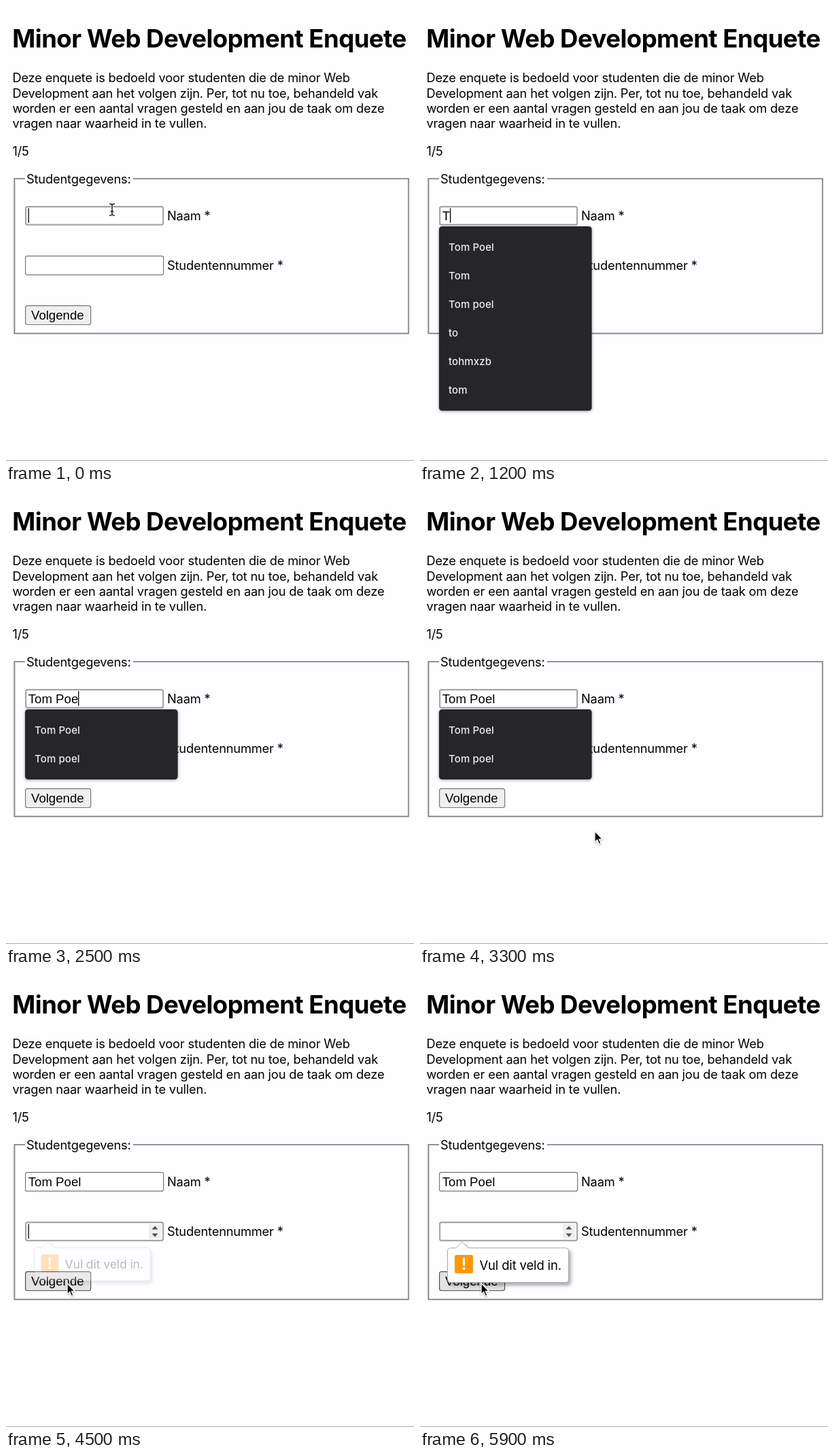
An HTML page that plays this animation: 600x669 px, repeating every 6000 ms.

```html
<!DOCTYPE html>
<html lang="nl">
<head>
<meta charset="utf-8">
<title>Enquete</title>
<style>
  html, body { margin: 0; width: 100%; height: 100%; overflow: hidden; background: #fefdff; }
  svg { display: block; width: 100%; height: 100%; }
  text { font: 18.25px Inter, "Open Sans", sans-serif; letter-spacing: -.17px; fill: #000; white-space: pre; }
  .title { font-size: 36.5px; font-weight: 700; letter-spacing: -.52px; }
  .control { font: 18.62px "Liberation Sans", Arial, sans-serif; letter-spacing: 0; }
  .option { font-size: 15px; font-weight: 500; letter-spacing: .1px; fill: #ededee; }
  .tip { font-size: 18.5px; }
  .field { fill: #fff; stroke: #767676; stroke-width: 1.2; }
  .field.focus { stroke: #a6a6a8; stroke-width: 2.2; width: 202px; height: 26.6px; transform: translate(.5px, .5px); }
  #menu { filter: drop-shadow(0 1px 2px rgba(0, 0, 0, .4)); }
  #bubble .box { fill: #fff; stroke: #a8a8a8; filter: drop-shadow(3px 4px 2.5px rgba(0, 0, 0, .32)); }
  #beam { fill: none; stroke: #000; stroke-width: 1.3; stroke-linecap: round; }
  #beam .halo { stroke: #fff; stroke-width: 2.8; }
  #arrow { stroke: #fff; stroke-width: 1.4; filter: drop-shadow(0 1px 1px rgba(0, 0, 0, .3)); }
</style>
</head>
<body>
<svg viewBox="0 0 600 669" preserveAspectRatio="none">
  <defs>
    <path id="ibar" d="M-3.6 -8.6Q-.5 -8.6 0 -6.6Q.5 -8.6 3.6 -8.6M0 -6.6V6.6M-3.6 8.6Q-.5 8.6 0 6.6Q.5 8.6 3.6 8.6M-2 2.6H2"/>
  </defs>
  <rect width="600" height="669" fill="#fefdff"/>
  <path d="M0 668.5H600" stroke="#a8a7a9"/>

  <text class="title" x="9.3" y="61">Minor Web Development Enquete</text>
  <text x="9.4" y="112.4">Deze enquete is bedoeld voor studenten die de minor Web</text>
  <text x="9.4" y="134.6">Development aan het volgen zijn. Per, tot nu toe, behandeld vak</text>
  <text x="9.4" y="156.9">worden er een aantal vragen gesteld en aan jou de taak om deze</text>
  <text x="9.4" y="179.2">vragen naar waarheid in te vullen.</text>
  <text x="9.4" y="220">1/5</text>

  <g fill="none">
    <path d="M28 254.2H12.7V481.7H592.2V254.2H187" stroke="#c4c3c5" stroke-width="2.3"/>
    <path d="M28 253.7H12.2V482M187 253.7H592.4M13 481.4H591.6V254" stroke="#7c7b7d" stroke-width="1.2"/>
  </g>
  <text x="30" y="261">Studentgegevens:</text>
  <text x="237" y="314.6">Naam *</text>
  <text x="237" y="387.8">Studentennummer *</text>

  <rect id="name" class="field" x="28.6" y="294.6" width="203" height="27.6" rx="2.5"/>
  <text id="typed" class="control" x="32.8" y="315"></text>
  <rect id="number" class="field" x="28.6" y="367.7" width="203" height="27.6" rx="2.5"/>
  <g id="spinner">
    <rect x="210" y="371" width="18" height="21" fill="#efefef"/>
    <path d="M214.5 378.5L219 373.5L223.5 378.5ZM214.5 384.5L219 389.5L223.5 384.5Z" fill="#4d4d4d"/>
  </g>
  <rect id="button" x="28.6" y="440.7" width="96" height="27.8" rx="3" stroke-width="1.2"/>
  <text class="control" x="37" y="461">Volgende</text>
  <rect id="caret" width="1.3" height="21.5"/>

  <g id="menu">
    <rect id="panel" x="28" y="324" width="224.6" rx="4.5" fill="#262528"/>
    <g id="options"></g>
  </g>

  <g id="bubble">
    <path class="box" d="M44.5 405.8H52.5L61.8 397L71 405.8H214.5Q218.5 405.8 218.5 409.8V452.5Q218.5 456.5 214.5 456.5H44.5Q40.5 456.5 40.5 452.5V409.8Q40.5 405.8 44.5 405.8Z"/>
    <rect x="51" y="416" width="27" height="27" rx="2.5" fill="#ff9800"/>
    <path d="M62.7 420.5H66.3L65.8 432H63.2ZM62.8 434.5H66.2V438H62.8Z" fill="#fff"/>
    <text class="tip" x="87.5" y="437.5">Vul dit veld in.</text>
  </g>

  <g id="beam">
    <use href="#ibar" class="halo"/>
    <use href="#ibar"/>
  </g>
  <path id="arrow" d="M0 0V16.4L3.7 12.9L6.4 19.2L9.1 18L6.4 11.9H11.4Z"/>
</svg>
<script>
const LOOP = 6000, STEP = 100;
const $ = id => document.getElementById(id);
const show = (id, on) => { $(id).style.display = on ? '' : 'none'; };
const setText = (el, s) => { if (el.textContent !== s) el.textContent = s; };

// Tables hold [start, value...]; the last row that has started applies.
const at = (table, t) => table.filter(row => row[0] <= t).pop();

const FULL = 'Tom Poel', LOWER = 'Tom poel', LONG = 'Tom Brock Poel';
const typing = [[0, 0], [1200, 1], [1400, 2], [1500, 3], [1700, 4], [2100, 5], [2400, 6], [2500, 7], [2700, 8]];
const menus = [
  [0, []],
  [100, [FULL, 'Tom', LONG, LOWER, 'to', 'tohmxzb']],
  [1200, [FULL, 'Tom', LOWER, 'to', 'tohmxzb', 'tom']],
  [1500, [FULL, 'Tom', LOWER, 'tom', LONG]],
  [1700, [FULL, LOWER, LONG]],
  [2100, [FULL, LOWER]],
  [3400, []]
];
const menuFade = [[0, 0], [100, .4], [200, .85], [300, 1]];
const carets = [[0, 1], [700, 0], [1200, 1], [3200, 0], [4400, 1], [4900, 0], [5400, 1], [5900, 0]];
const pointer = [
  [0, 'beam', 156, 299.5], [100, ''],
  [2800, 'beam', 157, 301], [2900, 'beam', 178, 309], [3000, 'arrow', 225, 380],
  [3100, 'arrow', 246, 440], [3200, 'arrow', 255, 485], [3300, 'arrow', 257, 503],
  [3400, 'arrow', 258, 505], [3600, 'arrow', 254, 505], [3700, 'arrow', 237, 502],
  [3800, 'arrow', 190, 491], [3900, 'arrow', 136, 479], [4000, 'arrow', 101, 468],
  [4100, 'arrow', 94, 461], [4200, 'arrow', 90, 457.5]
];
const buttonLook = [
  [0, '#efefef', '#767676'], [4100, '#e3e3e3', '#4f4f4f'],
  [4300, '#f5f5f5', '#8d8d8d'], [4400, '#e3e3e3', '#4f4f4f']
];

const options = Array.from({ length: 6 }, (_, i) => {
  const el = document.createElementNS('http://www.w3.org/2000/svg', 'text');
  el.setAttribute('class', 'option');
  el.setAttribute('x', 42);
  el.setAttribute('y', 360.4 + 42 * i);
  return $('options').appendChild(el);
});

function drawMenu(t) {
  const items = at(menus, t)[1];
  show('menu', items.length);
  $('menu').style.opacity = at(menuFade, t)[1];
  $('panel').setAttribute('height', 19 + 42 * items.length);
  options.forEach((el, i) => setText(el, items[i] || ''));
}

function drawFields(t) {
  const onName = t < 3400, onNumber = t >= 4400;
  $('name').classList.toggle('focus', onName);
  $('number').classList.toggle('focus', onNumber);
  show('spinner', onNumber);

  const [, fill, stroke] = at(buttonLook, t);
  $('button').setAttribute('fill', fill);
  $('button').setAttribute('stroke', stroke);

  const count = at(typing, t)[1];
  setText($('typed'), FULL.slice(0, count));
  const advance = onName && count ? $('typed').getComputedTextLength() : 0;
  show('caret', (onName || onNumber) && at(carets, t)[1]);
  $('caret').setAttribute('x', 32.6 + advance);
  $('caret').setAttribute('y', onName ? 297.3 : 370.5);
}

function drawBubble(t) {
  const age = t - 4400;
  show('bubble', age >= 0);
  if (age < 0) return;
  const scale = age < 1100 ? 1 - .1 * Math.exp(-Math.sqrt(age / 120)) : 1;
  $('bubble').style.opacity = Math.min(1, .05 + age / 480);
  $('bubble').setAttribute('transform', `translate(62 397) scale(${scale}) translate(-62 -397)`);
}

function drawPointer(t) {
  const [, kind, x, y] = at(pointer, t);
  for (const id of ['beam', 'arrow']) show(id, id === kind);
  if (kind) $(kind).setAttribute('transform', `translate(${x} ${y})`);
}

const start = performance.now();
function frame() {
  const elapsed = (performance.now() - start) % LOOP;
  const t = Math.floor(elapsed / STEP) * STEP;
  drawMenu(t);
  drawFields(t);
  drawBubble(t);
  drawPointer(t);
  requestAnimationFrame(frame);
}
frame();
</script>
</body>
</html>
```
